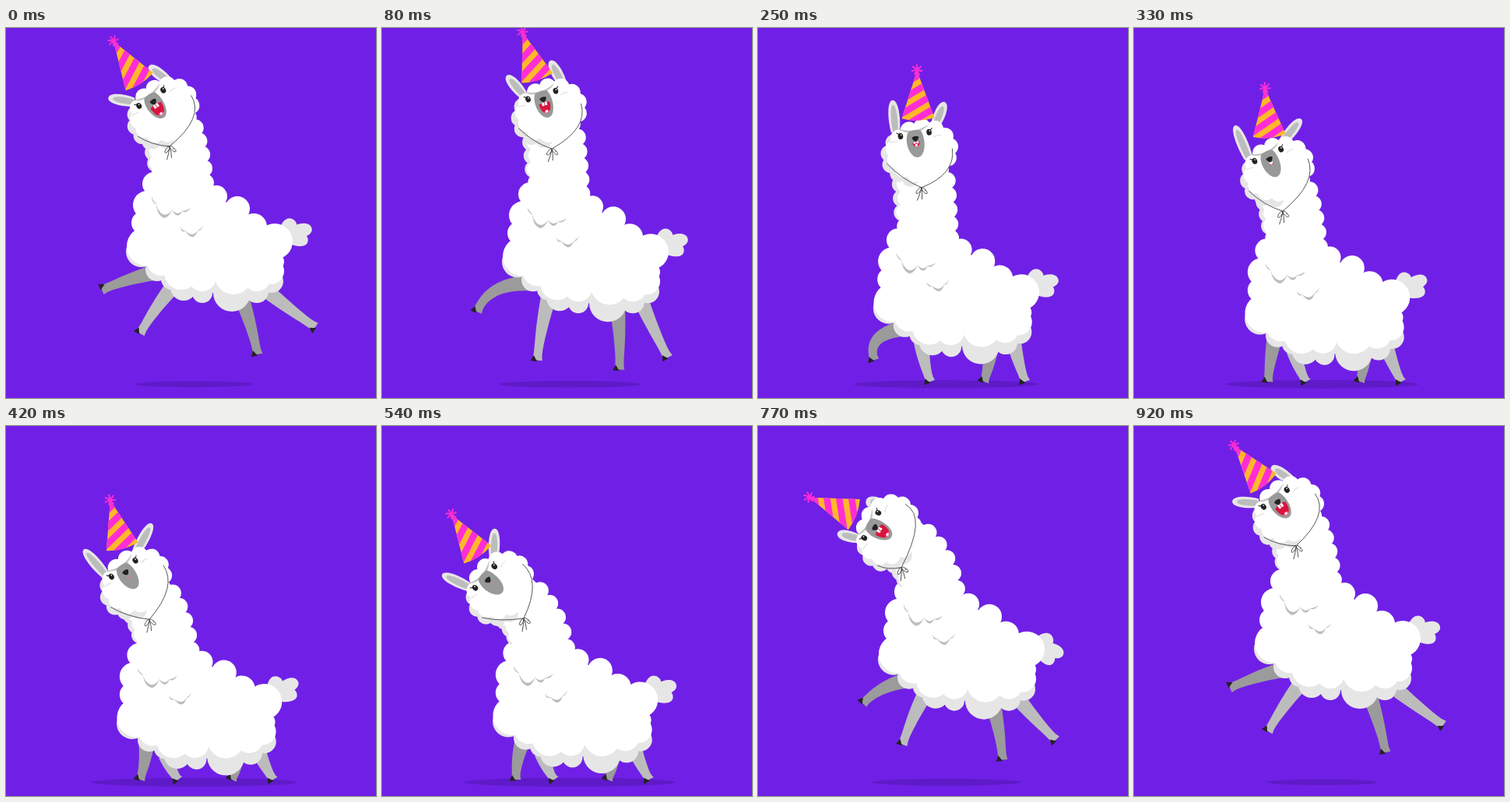
An HTML page with a canvas for the animation above (0.94 s loop, 475 px wide and 475 px high).

```html
<!DOCTYPE html>
<html lang="en">
<head>
<meta charset="utf-8">
<title>Party llama</title>
<style>
  html, body { margin: 0; width: 100%; height: 100%; overflow: hidden; background: #7020e6; }
  canvas { display: block; width: 475px; height: 475px; }
</style>
</head>
<body>
<canvas id="stage"></canvas>
<script>
const LOOP = 940;
const TIMES = [0, 80, 170, 330, 540, 670, 720, 770, 920];
const WHITE = '#fff', SHADE = '#e6e6e6', DARK = '#9b9b9b', LIGHT = '#bcbcbc', INK = '#222';
const PINK = '#ff2dd6', ORANGE = '#ffb829';

// Each track holds one value per entry of TIMES
const body = {
  x: [0, 0, 0, -12, -12, -5, -2, 0, 0],
  y: [-50, -37, 0, 29, 35, 8, -14, -37, -51],
  turn: [0, 0, 0, -5, -5, -2, -1, 0, 0],
  tail: [0, 0, 10, -5, 2, 42, 40, 33, 2],
  shadow: [76, 92, 110, 124, 136, 121, 109, 96, 71]
};
const head = {
  x: [186, 205, 221, 172, 132, 127, 127, 145, 181],
  y: [90, 86, 108, 163, 194, 181, 154, 128, 93],
  turn: [-33, -17, 0, -24, -48, -73, -70, -61, -36],
  mouth: [1, .85, .6, .12, 0, .5, .8, 1, 1]
};
const ears = {
  lx: [-46, -36, -25, -23, -34, -24, -27, -30, -47],
  ly: [-30, -37, -41, -52, -43, -49, -41, -33, -29],
  rx: [20, 23, 29, 58, 55, 28, 24, 22, 20],
  ry: [-36, -39, -44, -25, -32, -16, -14, -20, -36]
};
const hat = {
  x: [171, 199, 224, 174, 123, 106, 105, 123, 166],
  y: [69, 64, 90, 138, 165, 160, 136, 114, 74],
  turn: [-33, -18, -4, -5, -33, -55, -67, -69, -38]
};
const knot = {
  x: [210, 218, 225, 191, 182, 178, 181, 184, 208],
  y: [152, 155, 173, 235, 247, 230, 203, 182, 154]
};
const feet = {
  x: [123, 122, 121, 172, 172, 170, 156, 135, 123],
  y: [336, 364, 385, 454, 454, 428, 390, 357, 336],
  bend: [3, 25, 48, 2, 4, 16, 18, 10, 3],
  plant: [0, .55, 1, 1, 1, 1, .66, .28, 0]
};

const fluff = [
  [190, 250, 15], [181, 277, 18], [176, 300, 15], [180, 330, 25], [200, 348, 20],
  [225, 364, 22], [252, 370, 18], [292, 368, 24], [322, 370, 18], [340, 362, 17],
  [346, 350, 11], [345, 324, 23], [318, 305, 17], [297, 282, 16], [270, 266, 14]
];
const belly = [
  [174, 337, 20], [194, 360, 15], [213, 372, 14], [228, 383, 17], [252, 390, 13],
  [290, 390, 24], [322, 388, 15], [341, 375, 15]
];

const canvas = document.getElementById('stage');
const ctx = canvas.getContext('2d');
const dpr = window.devicePixelRatio || 1;
canvas.width = canvas.height = Math.round(475 * dpr);

const rad = deg => deg * Math.PI / 180;
const mix = (a, b, k) => a + (b - a) * k;

// Cyclic cubic through the keys; flat where a value is held
function sample(track, t) {
  const n = TIMES.length;
  const at = i => TIMES[(i + n) % n] + LOOP * Math.floor(i / n);
  const val = i => track[(i + n) % n];
  const slope = i => (val(i + 1) - val(i)) / (at(i + 1) - at(i));
  const tangent = i => {
    const a = slope(i - 1), b = slope(i);
    if (a === 0 || b === 0) return 0;
    const before = at(i) - at(i - 1), after = at(i + 1) - at(i);
    return (a * after + b * before) / (before + after);
  };
  let i = n - 1;
  while (TIMES[i] > t) i--;
  const span = at(i + 1) - at(i), u = (t - at(i)) / span, v = 1 - u;
  return v * v * (1 + 2 * u) * val(i) + u * u * (3 - 2 * u) * val(i + 1)
    + span * u * v * (v * tangent(i) - u * tangent(i + 1));
}

function pose(tracks, t) {
  const out = {};
  for (const name in tracks) out[name] = sample(tracks[name], t);
  return out;
}

function place(x, y, deg, draw) {
  ctx.save();
  ctx.translate(x, y);
  ctx.rotate(rad(deg));
  draw();
  ctx.restore();
}

// Position of a local point after the same move as place()
function locate(p, x, y) {
  const c = Math.cos(rad(p.turn)), s = Math.sin(rad(p.turn));
  return [p.x + x * c - y * s, p.y + x * s + y * c];
}

function oval(x, y, rx, ry, color, turn = 0) {
  ctx.fillStyle = color;
  ctx.beginPath();
  ctx.ellipse(x, y, rx, ry, turn, 0, 7);
  ctx.fill();
}

function shape(points, color) {
  ctx.fillStyle = color;
  ctx.beginPath();
  points.forEach(p => ctx.lineTo(p[0], p[1]));
  ctx.closePath();
  ctx.fill();
}

function puffs(list, color) {
  shape(list, color);
  list.forEach(([x, y, r]) => oval(x, y, r, r, color));
}

function curve(x0, y0, cx, cy, x1, y1, color, width) {
  ctx.strokeStyle = color;
  ctx.lineWidth = width;
  ctx.beginPath();
  ctx.moveTo(x0, y0);
  ctx.quadraticCurveTo(cx, cy, x1, y1);
  ctx.stroke();
}

function crescent(x0, y0, cx, cy, x1, y1, thick, color) {
  ctx.fillStyle = color;
  ctx.beginPath();
  ctx.moveTo(x0, y0);
  ctx.quadraticCurveTo(cx, cy, x1, y1);
  ctx.quadraticCurveTo(cx, cy - thick, x0, y0);
  ctx.fill();
}

function quad(a, c, b, t) {
  const v = 1 - t;
  const x = v * v * a[0] + 2 * v * t * c[0] + t * t * b[0];
  const y = v * v * a[1] + 2 * v * t * c[1] + t * t * b[1];
  const dx = v * (c[0] - a[0]) + t * (b[0] - c[0]);
  const dy = v * (c[1] - a[1]) + t * (b[1] - c[1]);
  const len = Math.hypot(dx, dy) || 1;
  return { x, y, dx: dx / len, dy: dy / len };
}

function leg(hip, end, bend, color) {
  const len = Math.hypot(end[0] - hip[0], end[1] - hip[1]);
  const dx = (end[0] - hip[0]) / len, dy = (end[1] - hip[1]) / len;
  const push = Math.abs(bend) * .35;
  const ctrl = [
    (hip[0] + end[0]) / 2 + dx * push - dy * bend,
    (hip[1] + end[1]) / 2 + dy * push + dx * bend
  ];
  const front = [], back = [];
  for (let i = 0; i <= 12; i++) {
    const t = i / 12, q = quad(hip, ctrl, end, t);
    const w = mix(10, 5.5, Math.min(1, t * 1.25)) + (t === 1 ? 1 : 0);
    front.push([q.x - q.dy * w, q.y + q.dx * w]);
    back.unshift([q.x + q.dy * w, q.y - q.dx * w]);
  }
  shape(front.concat(back), color);
  const q = quad(hip, ctrl, end, 1);
  const toe = (side, out) => [q.x - q.dy * side + q.dx * out, q.y + q.dx * side + q.dy * out];
  shape([toe(8.5, 1.5), toe(5, -6), toe(2.5, -2), toe(0, 1.5)], INK);
}

function drawTail(turn) {
  place(352, 318, turn, () => {
    [[-49, 28], [-15, 42], [9, 36]].forEach(([deg, len]) =>
      place(0, 0, deg, () => {
        ctx.fillStyle = SHADE;
        ctx.beginPath();
        ctx.moveTo(-4, 0);
        ctx.bezierCurveTo(len * .4, -13, len, -13, len, 0);
        ctx.bezierCurveTo(len, 11, len * .4, 11, -4, 0);
        ctx.fill();
      }));
  });
}

function drawCurls() {
  const c = '#bdbdbd';
  crescent(187, 264, 186, 274, 194, 277, 5, c);
  crescent(193, 276, 194, 293, 205, 293, 5, c);
  crescent(193, 277, 201, 307, 214, 283, 8, c);
  crescent(213, 283, 220, 298, 227, 284, 6, c);
  crescent(226, 285, 231, 289, 237, 281, 4, c);
  crescent(224, 304, 224, 313, 231, 311, 4, c);
  crescent(230, 310, 240, 327, 247, 309, 7, c);
  crescent(246, 310, 251, 311, 253, 303, 3, c);
}

function drawNeck(top, ctrl, base) {
  const bump = (t, side, color) => {
    const q = quad(top, ctrl, base, t);
    oval(q.x + q.dy * side, q.y - q.dx * side, 11, 11, color);
  };
  for (let t = .3; t < .65; t += .14) bump(t, -31, SHADE);
  ctx.lineCap = 'butt';
  curve(...top, ...ctrl, ...base, WHITE, 64);
  for (let i = 0; i < 6; i++) {
    const t = .3 + i * .14;
    bump(t, 29, WHITE);
    bump(t, t < .5 ? -25 : -28, WHITE);
  }
}

function drawEar(bx, by, tx, ty) {
  const len = Math.hypot(tx - bx, ty - by);
  place(bx, by, Math.atan2(ty - by, tx - bx) * 180 / Math.PI, () => {
    [[SHADE, 8, len], [LIGHT, 4.5, len - 6]].forEach(([color, w, end]) => {
      ctx.fillStyle = color;
      ctx.beginPath();
      ctx.moveTo(-4, -w * .7);
      ctx.bezierCurveTo(end * .4, -w * 1.1, end, -w * .9, end, 0);
      ctx.bezierCurveTo(end, w * .9, end * .4, w * 1.1, -4, w * .7);
      ctx.fill();
    });
  });
}

function drawHead(e) {
  drawEar(-24, -10, e.lx, e.ly);
  drawEar(29, -10, e.rx, e.ry);
  const ring = (from, to, dx, dy, color) => {
    for (let i = from; i < to; i++) {
      const a = rad(i * 360 / 13);
      oval(6 + dx + 36 * Math.cos(a), 22 + dy + 30 * Math.sin(a), 11, 11, color);
    }
  };
  ring(4, 9, -7, 5, SHADE);
  oval(6, 22, 40, 35, WHITE);
  ring(0, 13, 0, 0, WHITE);
}

function drawFace(open) {
  crescent(-22, -11, -10, 0, -1, -5, 5, '#c4c4c4');
  crescent(-1, -5, 9, 0, 20, -10, 5, '#c4c4c4');
  for (const s of [-1, 1]) {
    curve(s * 23, 7, s * 29, 5, s * 33, 6, '#dcdcdc', 1);
    oval(s * 18.5, 0, 3.3, 4, INK);
    curve(s * 20, -3, s * 22, -3, s * 23, -5, INK, 1);
    oval(s * 18.5 + 1, -1.5, .8, .9, WHITE);
  }
  ctx.fillStyle = '#999';
  ctx.beginPath();
  ctx.moveTo(-8, -4);
  ctx.bezierCurveTo(-16, 8, -10, 30, 0, 30);
  ctx.bezierCurveTo(10, 30, 14, 8, 8, -4);
  ctx.quadraticCurveTo(0, -7, -8, -4);
  ctx.fill();

  if (open > .04) {
    const w = 3 + 5 * open, h = 20 * open;
    ctx.save();
    ctx.beginPath();
    ctx.moveTo(-w, 11);
    ctx.quadraticCurveTo(0, 8, w, 11);
    ctx.bezierCurveTo(w, 11 + h, -w, 11 + h, -w, 11);
    ctx.fillStyle = '#d9153f';
    ctx.fill();
    ctx.clip();
    oval(0, 12 + h * .8, w * .7, h * .3, '#ff5f8d');
    ctx.fillStyle = WHITE;
    ctx.fillRect(-3.4, 9, 3, 2 + 3.5 * open);
    ctx.fillRect(.4, 9, 3, 2 + 3.5 * open);
    ctx.fillRect(-1.5, 8 + h * .72, 3, 3);
    ctx.restore();
  } else {
    oval(0, 13, 1.6, 1, '#d77f92');
  }
  ctx.fillStyle = INK;
  ctx.beginPath();
  ctx.moveTo(-4.5, 4);
  ctx.quadraticCurveTo(0, 1, 4.5, 4);
  ctx.quadraticCurveTo(3, 9, 0, 9.5);
  ctx.quadraticCurveTo(-3, 9, -4.5, 4);
  ctx.fill();
}

function drawString(h, k) {
  const left = locate(h, -41, 32), right = locate(h, 45, 25), bow = locate(h, 45, 58);
  const c = '#444', w = .9;
  curve(...left, (left[0] + k.x) / 2 - 3, (left[1] + k.y) / 2 + 5, k.x, k.y, c, w);
  curve(...right, ...bow, k.x, k.y, c, w);
  place(k.x, k.y, h.turn * .3 + 8, () => {
    curve(0, 0, -1, 8, -4, 17, c, w);
    curve(0, 0, 2, 7, 2, 15, c, w);
    ctx.beginPath();
    ctx.ellipse(-3, 4, 1.8, 5, .6, 0, 7);
    ctx.moveTo(5, 4);
    ctx.ellipse(4, 3.5, 1.8, 5, -.8, 0, 7);
    ctx.stroke();
  });
}

function drawHat() {
  ctx.save();
  ctx.beginPath();
  ctx.moveTo(0, -61);
  ctx.lineTo(21, 0);
  ctx.quadraticCurveTo(0, 6, -21, 0);
  ctx.closePath();
  ctx.fillStyle = ORANGE;
  ctx.fill();
  ctx.clip();
  for (let y = -54; y < 24; y += 18) curve(-30, y + 17, 0, y, 30, y - 17, PINK, 8.5);
  ctx.restore();
  ctx.lineCap = 'round';
  for (let i = 0; i < 7; i++) {
    const a = rad(i * 360 / 7 + 12), x = Math.cos(a), y = Math.sin(a);
    curve(x, -62 + y, x * 4 - y, -62 + y * 4 + x, x * 6.5, -62 + y * 6.5, PINK, 2);
  }
  ctx.lineCap = 'butt';
}

function draw(t) {
  const b = pose(body, t), h = pose(head, t), f = pose(feet, t), k = pose(knot, t);
  const cap = pose(hat, t), e = pose(ears, t);
  const frame = { x: 260 + b.x, y: 340 + b.y, turn: b.turn };
  const onBody = (x, y) => locate(frame, x - 260, y - 340);
  const step = (ax, ay, gx) => [mix(ax, gx, f.plant), mix(ay, 454, f.plant)];

  ctx.setTransform(dpr, 0, 0, dpr, 0, 0);
  ctx.fillStyle = '#7020e6';
  ctx.fillRect(0, 0, 475, 475);
  oval(241.5, 457.3, b.shadow, 1.5 + b.shadow * .031, '#5f1ac8');

  leg(onBody(190, 364), [f.x, f.y], f.bend, DARK);
  leg(onBody(302, 395), step(323, 419, 290), -3, DARK);
  leg(onBody(214, 382), step(172, 392, 221), 3, LIGHT);
  leg(onBody(332, 385), step(397, 384, 343), 2, LIGHT);

  const onFrame = paint => place(frame.x, frame.y, frame.turn, () => {
    ctx.translate(-260, -340);
    paint();
  });
  onFrame(() => {
    drawTail(b.tail);
    puffs(belly, SHADE);
    puffs(fluff, WHITE);
  });
  const base = onBody(228, 268);
  drawNeck(locate(h, 6, 22), [base[0] - 2, base[1] - 62], base);
  onFrame(drawCurls);
  place(h.x, h.y, h.turn, () => {
    drawHead(e);
    drawFace(h.mouth);
  });
  drawString(h, k);
  place(cap.x, cap.y, cap.turn, drawHat);
}

function tick() {
  draw(performance.now() % LOOP);
  requestAnimationFrame(tick);
}
tick();
</script>
</body>
</html>
```
